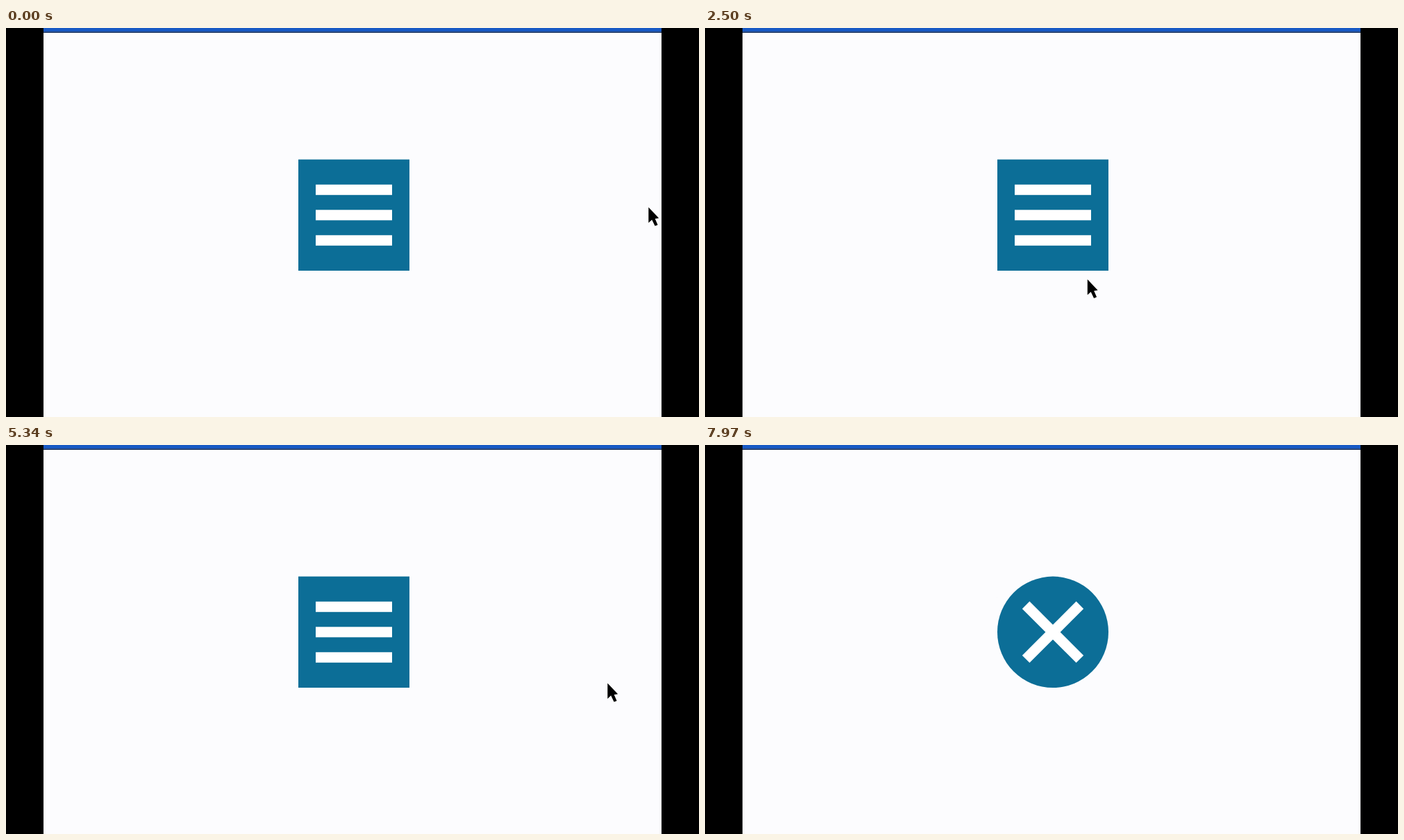
These frames come from a looping animation (998 by 561 pixels, 8 s). An HTML page:

```html
<!DOCTYPE html>
<html lang="en">
<head>
<meta charset="utf-8">
<title>Menu button</title>
<style>
  html, body { margin: 0; width: 100%; height: 100%; overflow: hidden; background: #000; }
  svg { display: block; width: 100%; height: 100%; }
</style>
</head>
<body>
<svg viewBox="0 0 998 561">
  <rect width="998" height="561" fill="#000"/>
  <rect x="54" width="890" height="561" fill="#fcfcfe"/>
  <rect x="54" width="890" height="5.5" fill="#1759c4"/>
  <rect x="54" y="5.2" width="890" height="1.8" fill="#1b3768"/>
  <rect id="button" x="421" y="189.6" width="160" height="160.4" fill="#0c6e97"/>
  <g fill="#fff">
    <rect id="middle" x="446" y="262.3" width="110" height="15"/>
    <rect id="top" x="-55" y="-7.5" width="110" height="15"/>
    <rect id="bottom" x="-55" y="-7.5" width="110" height="15"/>
  </g>
  <path id="cursor" d="M.3 .5V23L5.2 18.4 9.6 27.6 13.6 26 9.7 17 15.2 16.2Z"
    fill="#000" stroke="#fff" stroke-width="2.2" stroke-linejoin="round" paint-order="stroke"/>
</svg>
<script>
const LOOP = 8000, MORPH = 500, HOVER_LAG = 33, CURSOR_GONE = 7400;
const CENTER = { x: 501, y: 269.8 }, HALF = 80, GAP = 36.5;

// turning points of the pointer tip: time, x, y
const path = [
  [0, 925, 258], [450, 520, 320], [680, 555, 494], [1100, 505, 290], [1640, 525, 295],
  [1840, 592, 442], [2000, 606, 519], [2800, 525, 290], [3220, 540, 290], [3300, 634, 311],
  [3530, 850, 300], [3905, 520, 272], [4000, 574, 277], [4210, 866, 318], [4600, 866, 359],
  [5340, 866, 343], [6110, 866, 300], [6540, 561, 267], [7350, 520, 300], [7440, 960, 470]
];

const $ = id => document.getElementById(id);
const button = $('button'), middle = $('middle'), cursor = $('cursor');
const topBar = $('top'), bottomBar = $('bottom');

const slope = (i, axis) =>
  (path[i + 1][axis] - path[i][axis]) / (path[i + 1][0] - path[i][0]);

function tangent(i, axis) {
  if (i === 0 || i === path.length - 1) return 0;
  const a = slope(i - 1, axis), b = slope(i, axis);
  return a * b > 0 ? 2 * a * b / (a + b) : 0;
}

// Monotone cubic interpolation, so the pointer never overshoots a turn.
function along(t, axis) {
  let i = 0;
  while (i < path.length - 2 && path[i + 1][0] <= t) i++;
  const [t0, t1] = [path[i][0], path[i + 1][0]];
  const h = t1 - t0, s = Math.max(0, Math.min(1, (t - t0) / h)), r = 1 - s;
  return path[i][axis] * r * r * (1 + 2 * s) + path[i + 1][axis] * s * s * (3 - 2 * s)
    + h * s * r * (r * tangent(i, axis) - s * tangent(i + 1, axis));
}

const pointerAt = t => ({ x: along(t, 1), y: along(t, 2) });

function hovered(t) {
  const { x, y } = pointerAt(t - HOVER_LAG);
  return Math.abs(x - CENTER.x) < HALF && Math.abs(y - CENTER.y) < HALF;
}

// The pointer alternately enters and leaves the button.
const toggles = [];
for (let t = 0; t < CURSOR_GONE; t++) {
  if (hovered(t) !== (toggles.length % 2 === 1)) toggles.push(t);
}

// cubic-bezier(.25, .1, .25, 1)
function ease(x) {
  if (x <= 0) return 0;
  if (x >= 1) return 1;
  const curve = (a, b, s) => 3 * a * s * (1 - s) ** 2 + 3 * b * s * s * (1 - s) + s ** 3;
  let lo = 0, hi = 1;
  for (let i = 0; i < 24; i++) {
    const mid = (lo + hi) / 2;
    if (curve(.25, .25, mid) < x) lo = mid; else hi = mid;
  }
  return curve(.1, 1, lo);
}

// Interrupted transitions turn back from their current value.
function morphAt(t) {
  let value = 0;
  for (let i = 0; i < toggles.length && toggles[i] <= t; i++) {
    const goal = i % 2 ? 0 : 1;
    const end = Math.min(t, toggles[i + 1] ?? LOOP);
    const span = MORPH * Math.abs(goal - value);
    if (span) value += (goal - value) * ease((end - toggles[i]) / span);
  }
  return value;
}

function placeBar(bar, side, p) {
  const y = CENTER.y + side * GAP * (1 - p);
  bar.setAttribute('transform', `translate(${CENTER.x} ${y}) rotate(${-side * 45 * p})`);
}

function draw(t) {
  const p = morphAt(t), { x, y } = pointerAt(t);
  button.setAttribute('rx', HALF * p);
  button.setAttribute('ry', HALF * p);
  middle.setAttribute('opacity', 1 - p);
  placeBar(topBar, -1, p);
  placeBar(bottomBar, 1, p);
  cursor.setAttribute('visibility', t < CURSOR_GONE ? 'visible' : 'hidden');
  cursor.setAttribute('transform', `translate(${x} ${y})`);
}

const start = performance.now();
function tick() {
  draw((performance.now() - start) % LOOP);
  requestAnimationFrame(tick);
}
tick();
</script>
</body>
</html>
```
